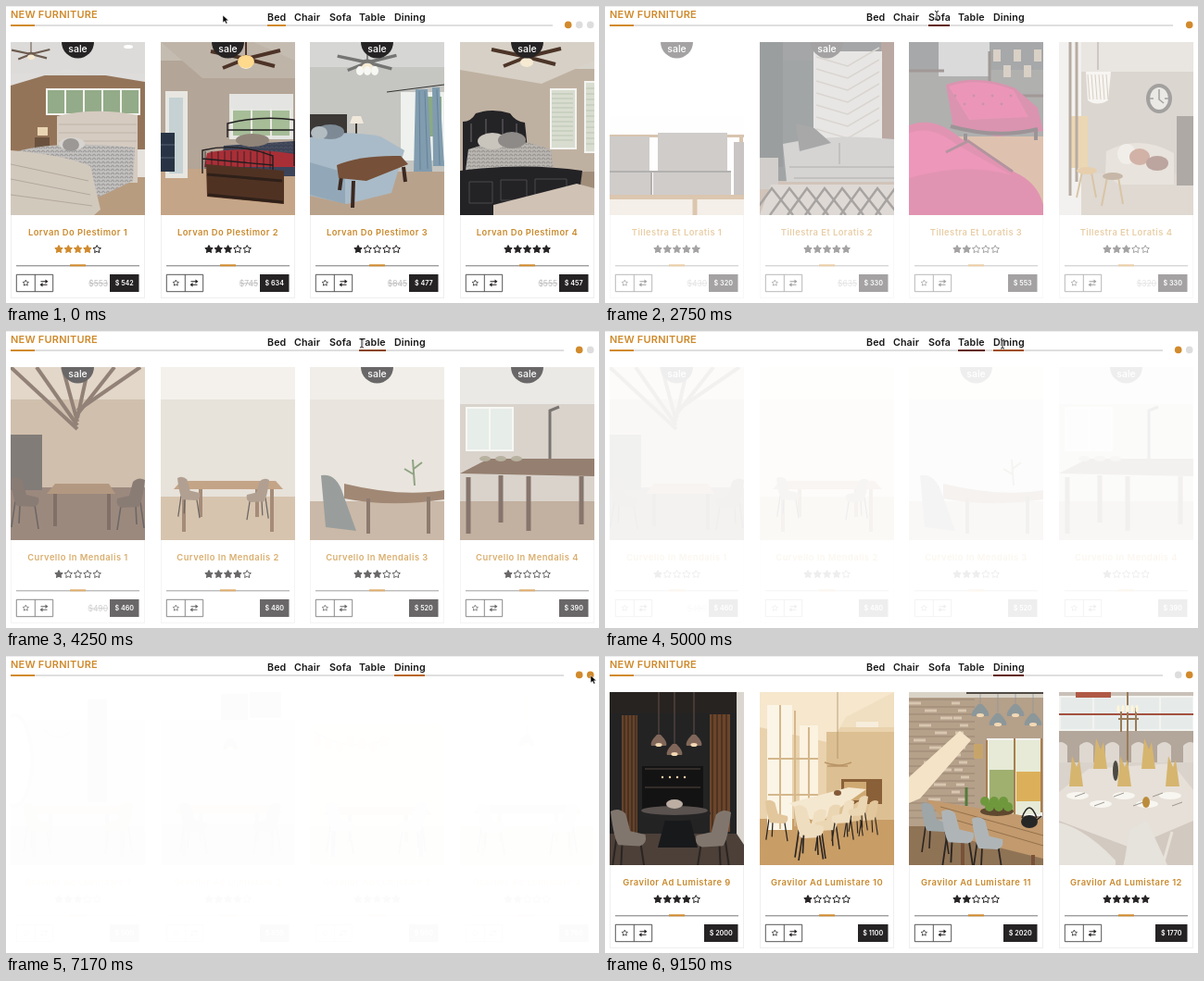
Animation, 640 px wide and 321 px high, one loop 9290 ms. Source, as an HTML page:

```html
<!DOCTYPE html>
<html lang="en">
<head>
<meta charset="utf-8">
<title>New furniture</title>
<style>
html, body { margin: 0; width: 100%; height: 100%; overflow: hidden; background: #fff; }
svg { display: block; width: 640px; height: 321px; font-family: Inter, "Open Sans", sans-serif; }
.head { font-size: 11px; font-weight: 600; letter-spacing: .2px; fill: #cf8a2c; }
.tab { font-size: 10.7px; font-weight: 600; letter-spacing: .1px; fill: #161616; }
.title { font-size: 9.4px; font-weight: 600; letter-spacing: .45px; fill: #c98a2e; text-anchor: middle; }
.sale { font-size: 10.5px; font-weight: 500; fill: #fff; text-anchor: middle; }
.price { font-size: 7.2px; font-weight: 600; fill: #fff; text-anchor: middle; }
.old { font-size: 8.5px; fill: #bbb; text-anchor: end; text-decoration: line-through; }
</style>
</head>
<body>
<script>
const LOOP = 9290, GOLD = '#d18a2c', INK = '#262324', MAROON = '#621d10';

// drawing helpers
const p = (fill, d) => `<path fill="${fill}" d="${d}"/>`;
const l = (color, w, d) => `<path fill="none" stroke="${color}" stroke-width="${w}" d="${d}"/>`;
const b = (fill, x, y, w, h) => `<rect fill="${fill}" x="${x}" y="${y}" width="${w}" height="${h}"/>`;
const e = (fill, x, y, rx, ry = rx) => `<ellipse fill="${fill}" cx="${x}" cy="${y}" rx="${rx}" ry="${ry}"/>`;
const text = (cls, x, y, s) => `<text class="${cls}" x="${x}" y="${y}">${s}</text>`;
const rep = (n, fn) => Array.from({ length: n }, (_, i) => fn(i)).join('');
const room = (ceiling, wall, floor, top, bottom) =>
  b(ceiling, 0, 0, 145, top) + b(wall, 0, top, 145, bottom - top) + b(floor, 0, bottom, 145, 187 - bottom);
const panes = (n, x, y, w, h, glass) =>
  b('#f3f3ef', x, y, n * w + 2, h) + rep(n, i => b(glass, x + 2 + i * w, y + 2, w - 2, h - 4));
const fan = (x, y, c, s = 1) => `<g transform="translate(${x} ${y}) scale(${s})">` +
  l(c, 4, 'M0 0l-38-8M0 0l37-9M0 0l-25 10M0 0l31 8') + l(c, 2, 'M0-30V0') + e(c, 0, 0, 7, 4) + e('#f6ead2', 0, 6, 7, 5) + '</g>';
const pendant = (x, y, c, r = 8) => l(c, .7, `M${x} 0V${y - r}`) +
  p(c, `M${x - 2} ${y - r}h4Q${x + r + 2} ${y} ${x + r} ${y + 4}H${x - r}Q${x - r - 2} ${y} ${x - 2} ${y - r}z`) +
  e('#f3d9b4', x, y + 3, r * .45, 2);
const chair = (x, y, c, s = 1) => `<g transform="translate(${x} ${y}) scale(${s} ${Math.abs(s)})">` +
  l('#2a2522', 1.6, 'M5 24 1 52M26 28l4 26M10 28l-1 20') +
  p(c, 'M0 0Q7-4 13 2L17 17 30 20Q32 28 25 30L7 29Q3 25 0 0z') + '</g>';
const table = (c, y, legs) => p(c, `M22 ${y}H124l8 9H14z`) +
  l(legs, 4, `M25 ${y + 9}V178M120 ${y + 9}V178M43 ${y + 9}V162M104 ${y + 9}V162`);
const woven = d => p('url(#weave)', d);

const scenes = {
  bed: [
    room('#dcdbd9', '#947459', '#b89c80', 36, 130) + p('#dedddb', 'M0 34h145v9L60 29 0 47z') +
      fan(22, 13, '#6d5c50', .55) + e('#fff', 127, 5, 5, 2) + panes(5, 38, 50, 20, 29, '#93ab88') +
      b('#ead5b2', 29, 92, 11, 9) + b('#6a513e', 26, 103, 16, 15) +
      p('#d5cbc0', 'M50 80Q92 70 137 79v73H50z') + l('#b9aea2', .8, 'M52 89h84M52 98h84M52 107h84') +
      p('#c3c1bf', 'M8 118Q50 106 134 114l-2 36-36 17z') + woven('M8 118Q50 106 134 114l-2 36-36 17z') +
      e('#d7d4d0', 66, 110, 14, 7) + e('#9b9895', 65, 111, 9, 7) +
      p('#d2c9bd', 'M0 117Q58 122 86 134l11 47-7 6H0z') + l('#aaa095', .8, 'M0 132l84 18M0 148l86 17M0 165l88 12') +
      b('#e6e2dc', 137, 116, 8, 30),
    room('#c5bcb1', '#b3a597', '#c5a587', 20, 137) + p('#bfb4a8', 'M0 0 45 39H145V20L100 0z') +
      fan(92, 18, '#4d3327') + e('#ffd98c', 92, 21, 9, 7) + b('#e8e6e1', 5, 53, 24, 94) + b('#c5d1d3', 9, 60, 15, 82) +
      b('#e4e5e2', 74, 56, 69, 49) + b('#a6bd98', 77, 74, 63, 27) + rep(4, i => b('#eceae5', 76 + i * 21, 72, 2, 32)) +
      b('#283445', 0, 98, 15, 42) + l('#566273', 1, 'M0 111h15M0 125h15') + p('#3b4358', 'M68 112 145 107v38H64z') +
      woven('M68 112 145 107v12H66z') + p('#a92f37', 'M50 120Q82 112 145 121v14H47z') + e('#918579', 99, 106, 18, 7) +
      l('#211e20', 1.4, 'M72 103V88q36-9 72-4v50M72 95h72M45 142v-25q38-9 76 6v20M45 126l76 7') +
      rep(11, i => l('#211e20', .8, `M${48 + i * 7} 118v19`)) +
      p('#503223', 'M49 132 133 139v36l-83-8z') + l('#2e2019', 3, 'M50 143l81 7M51 165l81 8'),
    room('#d6d7d5', '#c5c5c1', '#b9a28c', 27, 140) + fan(62, 22, '#757573', .85) + rep(3, i => e('#f7f7f3', 54 + i * 8, 31, 4, 5)) +
      b('#eef1ed', 98, 54, 47, 74) + b('#8aaa82', 125, 59, 17, 43) + l('#333', 1, 'M83 54 145 46') +
      p('#819cae', 'M114 51h13l5 89h-20zM132 49h8l5 85h-12z') + l('#64839a', 1, 'M118 53l1 85M124 53l3 84M137 51l3 82') +
      b('#3b3836', 0, 78, 40, 31) + p('#f0e8da', 'M46 80h9l3 8H43z') + l('#41342d', 2, 'M50 88v17') +
      p('#a9bbc8', 'M0 103Q35 94 76 102l26 15-14 46-48 12L0 166z') + e('#7d8a95', 22, 97, 15, 8) + e('#b2bcc1', 10, 98, 9, 7) +
      p('#92a8b8', 'M0 130 38 141v34L0 165z') + l('#3b2820', 4, 'M34 145l-2 15M47 150l-1 29M101 135l2 16') +
      p('#765039', 'M29 133Q54 122 98 123l8 9-45 18-30-3z'),
    room('#d8d3ca', '#bfb1a1', '#a08e7b', 29, 140) + p('#d7d0c6', 'M0 30 88 45 145 20V0H0z') + fan(72, 16, '#4c3528') +
      panes(1, 97, 50, 27, 66, '#d8ddd0') + panes(1, 134, 42, 20, 78, '#d8ddd0') +
      rep(11, i => l('#aeb9a4', .7, `M99 ${56 + i * 5}h23M136 ${50 + i * 6}h9`)) + p('#242326', 'M3 140V86Q12 86 17 77 35 71 54 77 60 86 70 87l5 49z') +
      l('#49464a', 2, 'M12 108V88M28 107V83M46 107V83M61 107V88') +
      p('#bab6b1', 'M9 116Q60 98 98 117l4 29-96-7z') + woven('M9 116Q60 98 98 117l4 29-96-7z') +
      e('#c9c5bd', 35, 107, 16, 9) + e('#8d8a87', 56, 106, 15, 9) +
      p('#232225', 'M0 139Q70 130 132 139l-4 31-91 17H0z') + l('#4b484b', 1, 'M10 151h25v23H10zM44 149h28v22H44zM81 148h34v17H81z') +
      p('#d0c3b5', 'M36 176 126 153l19 5v29H36z')
  ],
  chair: [
    room('#d2d4d4', '#d0d2d2', '#dededd', 40, 158) + l('#96663e', 4, 'M11 45Q9 102 19 115M50 44Q44 90 51 113M11 47q20-11 39-1M18 90h30') +
      l('#96663e', 2, 'M25 48q5 26-1 42M38 47q-6 27 1 43') + l('#96663e', 4, 'M20 124v63M94 120l-7 63M56 130l5 57') +
      p('#708078', 'M33 116Q62 102 98 113l-5 13-50 6z') + e('#c8bba8', 64, 96, 12, 8) + e('#f1eee9', 64, 91, 9, 4) +
      p('#e9e7e4', 'M17 103Q41 88 54 116l15 57-22 13-42-3z') + l('#bcb6b0', 1.5, 'M20 113q12 42 4 69M38 109q7 35 15 65') +
      b('#eeeeec', 104, 131, 17, 26) + l('#c7a47b', 1.5, 'M112 132l-9-49M113 132l4-50M111 132l16-43'),
    room('#bbb4ae', '#bab2ad', '#81807e', 30, 145) + p('#605f61', 'M0 158 145 122v19L0 178z') +
      l('#6a3c23', 5, 'M39 62l5 118M77 60l5 60M104 112v56M65 120v66M43 113l20 9 43-9M43 150l60-2') +
      p('#4c352b', 'M37 60 77 58l3 17-40 2zM39 83l41-1 1 10-41 1z') +
      p('#523626', 'M40 110 67 102 108 111 65 122z') + p('#824a32', 'M48 104h40v9H49z'),
    room('#e3e6e8', '#dadde0', '#c79866', 48, 145) + p('#fff', 'M0 0h51v121L0 130z') + l('#d6dde0', 2, 'M24 0v119M4 12h42M8 57h38') +
      rep(14, i => l('#c5cbce', .8, `M40 ${i * 7}h12`)) + p('#dadde0', 'M145 140V125L42 119 0 148v12z') +
      l('#b28253', 1, 'M0 168l145-28M20 187 145 155M0 155l108 32') + l('#b88c5b', 2, 'M75 138l-15 45M98 136l6 38M86 138l9 45') +
      p('#f5f5f2', 'M56 123q19 5 22-9 0-19 21-22 19 0 13 27-4 21-23 21-26 0-33-17z') + l('#bfc2c1', 1, 'M79 119q15 12 32 3') +
      e('#202326', 40, 148, 25, 11) + e('#454b4e', 40, 144, 25, 8) + e('#eee', 32, 142, 6, 3) + e('#c59a62', 47, 143, 4, 3) +
      l('#252729', 2, 'M17 152v35M62 152v33M39 158v29'),
    room('#e9b24d', '#e5aa40', '#bfc3c2', 40, 130) + p('#eac26d', 'M0 0H145V35Q75 16 0 55z') +
      p('#7f9192', 'M0 126q72 4 145 0v24q-70 4-145-1z') + p('#d8d7d1', 'M0 153h145v34H0z') + l('#8d8e87', 2, 'M0 157q74-8 145 0') +
      l('#9f4f25', 1.5, 'M52 134V66Q45 43 35 55M42 135l10-24 13 24') + p('#f4eee0', 'M34 54Q53 28 70 54z') +
      e('#ad5527', 54, 98, 17, 3) + e('#76442e', 52, 135, 10, 3) +
      p('#26424d', 'M73 97q18-4 35 2l2 14-4 8H81l-6-10z') + p('#142e39', 'M78 113h29l-3 7H81z') + l('#1c2e35', 2, 'M82 121l-6 18M102 121l6 18')
  ],
  sofa: [
    room('#fff', '#fdfdfc', '#e5d8c8', 80, 168) + b('#a3723f', 0, 100, 145, 3) + rep(5, i => b('#a3723f', i * 35, 101, 4, 48)) +
      b('#8b847e', 0, 102, 43, 39) + b('#8d8680', 52, 98, 75, 43) + b('#7d7672', 134, 108, 11, 57) +
      p('#8d8680', 'M0 140h45v25H0zM47 140h84v25H47z') + l('#4b4543', 2, 'M0 140h131M45 140v25') +
      b('#aa7740', 0, 165, 145, 5) + l('#aa7740', 5, 'M92 170v17'),
    room('#262d2e', '#1f292c', '#94745c', 20, 150) + p('#5c3024', 'M131 0h14v120h-14z') + b('#12191c', 0, 0, 25, 135) +
      b('#c9c4be', 58, 10, 74, 117) + rep(7, i => l('#a39b92', 1.5, `M61 ${16 + i * 13}l34 10 34-20`)) +
      b('#938b83', 0, 125, 20, 34) + p('#9b9896', 'M25 110Q82 98 145 105v46H29z') + l('#625e5b', 1.5, 'M86 109v23M32 135h113M37 147h108') +
      p('#313134', 'M39 88l20 5 18 16-34 9z') + p('#b0a59b', 'M12 154h133v33H0z') +
      rep(8, i => l('#2f2521', 2.5, `M${i * 19 - 8} 187l21-29 23 29`)),
    room('#2d3032', '#444442', '#b06f40', 30, 102) + b('#a6a7a9', 32, 0, 55, 37) + l('#1f0d06', 3, 'M0 31h38M87 10v48M145 58H87') +
      rep(5, i => b('#a58f78', 91 + i * 11, 8 + i % 2 * 17, 8, 13)) +
      p('#a60040', 'M40 46Q74 34 115 50l24 21 6 25-50 6-47-10z') + p('#cf0657', 'M43 48Q75 37 113 52l16 29-64 3z') +
      rep(7, i => e('#7c0035', 50 + i * 10, 58 + i % 2 * 9, 1.4)) + l('#140208', 4, 'M45 91q50 14 94 3M61 99v12M137 95v11') +
      p('#b80045', 'M0 90Q27 79 56 104l59 37q24 11 30 35v11H0z') + p('#d4085c', 'M0 98q25-9 52 13l59 33Q62 129 0 147z') +
      l('#4a001c', 3, 'M40 119l24-12 48 33'),
    room('#cbc0b5', '#aa9d90', '#b3a595', 32, 142) + p('#e3ded8', 'M0 0h24v187H0z') + b('#cfa04a', 13, 80, 18, 56) +
      l('#543b25', 3, 'M12 0v166M19 0v151') + l('#4a362e', 1, 'M42 0v30') + p('#ede8df', 'M29 32h27l-3 31q-12 7-22 0z') +
      rep(6, i => l('#a18b6d', 1, `M${31 + i * 4} 35l2 27`)) + e('#25201c', 108, 61, 14, 16) + e('#d0cbc2', 108, 61, 10, 12) +
      l('#25201c', 1.5, 'M108 51v11l5 4M98 61h4M114 61h4') + p('#c8bcac', 'M51 118Q87 99 124 120v34H65L50 143z') +
      e('#ded7cc', 73, 121, 10, 11) + e('#95482b', 87, 124, 11, 9) + e('#60261b', 106, 131, 12, 8) +
      b('#42322a', 127, 80, 18, 75) + l('#a5752c', 2, 'M25 140l-6 28M35 141l5 27M52 146l-6 31M64 146l5 29') +
      e('#c58e3c', 30, 139, 11, 4) + e('#785430', 58, 145, 11, 4)
  ],
  table: [
    room('#d5c5b1', '#bba389', '#705444', 35, 130) + rep(6, i => l('#61493a', 4, `M${i * 28} 0L72 ${67 - i * 4}`)) +
      b('#49423c', 0, 73, 34, 60) + p('#916a49', 'M48 126h58l7 11H39z') + l('#493124', 4, 'M48 137v35M106 137v39') + chair(0, 121, '#554238') + chair(145, 122, '#554238', -1),
    room('#f0ebe4', '#ddd5ca', '#c6aa8a', 35, 140) + table('#aa7c51', 123, '#7d593e') + chair(18, 120, '#8f7660', .8) + chair(117, 122, '#8f7660', -.8),
    room('#ebe7df', '#e0d9cf', '#b39a81', 35, 145) + p('#785337', 'M37 126q62 15 108 7v10q-58 9-108-1z') +
      l('#5b402f', 4, 'M63 142v38M128 140v40') + p('#6c7372', 'M12 117q17-3 24 21l14 39-33-4z') + l('#5e7a4a', 2, 'M113 128l-2-28M112 116l-10-6M112 110l9-7'),
    room('#e2dfda', '#c9c0b6', '#a78d76', 40, 145) + panes(2, 6, 43, 25, 48, '#dce5df') + l('#403832', 3, 'M97 115V47l10-4') +
      p('#664631', 'M0 115 31 99h114v19z') + l('#50372a', 5, 'M9 119v61M44 117v51M74 118v59M131 118v52') + rep(3, i => e('#978e75', 27 + i * 17, 99, 6, 3))
  ],
  dining: [
    room('#e9e4dc', '#cfc5b8', '#a78d73', 30, 145) + e('#898278', 5, 74, 20, 51) + e('#ede9e2', 4, 74, 17, 47) +
      b('#5b5a56', 83, 8, 21, 111) + l('#796653', 1.5, 'M35 40q17 16 29 3') + table('#a37a54', 123, '#71533d') + chair(13, 121, '#756b60') + chair(132, 121, '#756b60', -1),
    room('#dfd8cf', '#c6b8a8', '#a58d76', 30, 143) + b('#5f666a', 65, 2, 29, 28) + b('#5f666a', 96, 0, 34, 28) +
      pendant(75, 58, '#75624f') + table('#ad855f', 122, '#604634') + chair(20, 121, '#776657') + chair(130, 121, '#776657', -1),
    room('#eee9df', '#dbd1c3', '#b99b77', 35, 145) + l('#6c5542', 1, 'M4 43q38 24 82 7') + rep(7, i => e('#d8aa54', 8 + i * 12, 53 + i % 3 * 3, 4, 6)) +
      table('#aa784f', 124, '#825c42') + chair(17, 121, '#bdae9b') + chair(126, 121, '#bdae9b', -1),
    room('#eeeae4', '#dfd8ce', '#c5ad93', 35, 145) + pendant(72, 54, '#b89975') + table('#bd9775', 122, '#967357') + chair(18, 122, '#d1c5b5') + chair(127, 122, '#d1c5b5', -1)
  ],
  dining2: [
    room('#272321', '#232324', '#4c4039', 23, 153) + b('#65432b', 13, 25, 17, 130) + b('#6b452b', 108, 24, 22, 127) +
      rep(4, i => l('#322318', 1, `M${16 + i * 4} 25v130M${111 + i * 5} 24v127`)) + p('#dcd6d0', 'M137 0h8v165l-8-12z') +
      b('#141314', 35, 80, 66, 50) + l('#51463e', 1, 'M38 83h60M38 103h60') + pendant(53, 54, '#80675a') + pendant(70, 64, '#80675a') + pendant(91, 54, '#80675a') +
      rep(4, i => e('#ffd8a6', 57 + i * 8, 92, 1.2)) + p('#18191b', 'M60 138h27l8 30H52z') + e('#252425', 71, 131, 38, 8) + e('#59524f', 70, 128, 36, 5) +
      e('#bcaea3', 70, 121, 9, 5) + chair(1, 129, '#81766d', 1.25) + chair(131, 130, '#81766d', -1.25),
    room('#f0dfc0', '#e9d2ad', '#c89d66', 38, 137) + p('#f6e7cd', 'M0 0h145L93 27 77 55 0 38z') + p('#dcc093', 'M72 43h73v95H72z') +
      b('#fbf5e7', 8, 14, 27, 135) + b('#fbf2e0', 43, 36, 20, 96) + l('#d4b78b', 2, 'M9 72h54M9 111h54M22 14v134M53 38v93M38 20v125') +
      l('#a88558', .7, 'M84 0v72') + l('#b99567', 1.5, 'M70 76q15 6 29 0M73 80h22') + b('#8a6038', 88, 94, 44, 27) + b('#cfa972', 91, 97, 24, 20) +
      b('#f7eddc', 104, 32, 24, 6) + chair(112, 119, '#e3c79c', -.7) + chair(128, 118, '#e3c79c', -.7) +
      p('#f5e8d0', 'M32 120 96 103l19 2-44 31-16 2z') + chair(6, 118, '#e2c69c', .8) +
      rep(4, i => chair(72 + i * 15, 128 - i * 5, i % 2 ? '#ebd6b3' : '#f0dec0', -1 + i * .1)) +
      chair(37, 124, '#efddbf', 1.05) + e('#835938', 84, 109, 4, 3),
    room('#d9d3c8', '#b5a08a', '#8f7355', 6, 145) +
      rep(17, i => l('#8f7b69', .7, `M0 ${8 + i * 8}h71`) + l('#d8c6b0', 3, `M${i * 17 % 40} ${12 + i * 8}h13M${46 + i * 7 % 12} ${12 + i * 8}h9`)) +
      p('#f4e3c6', 'M0 92 55 42l12 10L12 115 0 120z') + panes(2, 84, 50, 29, 84, '#e6ead6') +
      b('#9fb06f', 87, 84, 26, 45) + b('#dcb05a', 116, 86, 27, 32) + l('#a97d4e', 2, 'M84 52v82M114 50v84M143 50v80') + b('#c7a56a', 70, 56, 10, 16) +
      rep(4, i => pendant(77 + i * 19, 22 + i % 2 * 10, '#8c979a', 9)) + l('#514b45', 2, 'M62 1h83') +
      p('#c29a6e', 'M18 116 145 137v43L57 158z') + l('#785139', 4, 'M58 158v29M134 176v11') + l('#94704b', 1, 'M34 124l111 31M46 137l99 29') +
      chair(13, 121, '#9ea6a8', 1) + chair(35, 129, '#afb5b7', 1.15) + chair(68, 137, '#afb5b7', 1.1) +
      e('#5e482f', 95, 129, 18, 5) + rep(6, i => e('#6f983d', 82 + i * 5, 118 + i % 2 * 6, 5)) + l('#547a3d', 3, 'M62 123v-20') +
      e('#252626', 130, 140, 9, 7) + l('#252626', 1.5, 'M122 136q8-22 16 0M137 139l6-5'),
    room('#c9c1b8', '#b3a69a', '#d9d3cc', 32, 76) + panes(4, 0, 4, 36, 38, '#e6ebea') + b('#b05a45', 18, 0, 38, 6) + l('#a4503f', 2, 'M0 24h145') +
      rep(6, i => p('#ded8d1', `M${i * 28 - 6} 76v-18q8-8 15 0v18z`)) +
      p('#e6e0d8', 'M0 108 32 83 122 77l23 29v37L77 169 0 140z') + p('#d2c9c0', 'M0 139 77 168l68-29v48H0z') +
      l('#e8e2da', 3, 'M17 151l15 35M76 168l-5 19M122 151l-9 32') + p('#e6e2dc', 'M70 187l6-38 19-10 22 48zM0 141q29 7 61 41v5H0z') +
      l('#987b58', 2, 'M74 99V0M64 29h22M67 21v22M83 17v25') + rep(5, i => e('#fff5d8', 64 + i * 5, 18, 1.5, 4)) +
      rep(5, i => p('#d6b56f', `M${11 + i * 26} ${102 - i % 2 * 19}l3-33 5 12 3-8 4 29z`) + e('#f8f6f0', 20 + i * 25, 112 + i % 2 * 9, 12, 4)) +
      rep(6, i => l('#9c9890', 1, `M${17 + i * 21} ${113 + i % 2 * 10}l11-4`)) + e('#bc8c3d', 94, 119, 4, 6) + e('#4d4a42', 61, 85, 3, 11)
  ]
};

// name, first number, ratings, badges, prices, struck prices
const panels = {
  bed: ['Lorvan Do Plestimor', 1, [4, 3, 1, 5], [1, 1, 1, 1], [542, 634, 477, 457], [553, 745, 845, 555]],
  chair: ['Morbelo Si Tandus', 1, [3, 3, 2, 4], [1, 0, 1, 0], [90, 70, 100, 140], [134, 0, 132, 0]],
  sofa: ['Tillestra Et Loratis', 1, [5, 5, 2, 3], [1, 1, 0, 0], [320, 330, 553, 330], [430, 635, 0, 320]],
  table: ['Curvello In Mendalis', 1, [1, 4, 3, 1], [1, 0, 1, 1], [460, 480, 520, 390], [490, 0, 0, 0]],
  dining: ['Gravilor Ad Lumistare', 1, [3, 4, 5, 2], [0, 0, 0, 0], [900, 850, 990, 780], [0, 0, 0, 0]],
  dining2: ['Gravilor Ad Lumistare', 9, [4, 1, 2, 5], [0, 0, 0, 0], [2000, 1100, 2020, 1770], [0, 0, 0, 0]]
};

const starPath = 'M' + rep(10, i => {
  const a = i * Math.PI / 5, r = i % 2 ? 2.2 : 4.4;
  return `${(r * Math.sin(a)).toFixed(2)} ${(-r * Math.cos(a)).toFixed(2)} `;
}) + 'z';
const star = (x, y, c, full, s = 1) =>
  `<path d="${starPath}" transform="translate(${x} ${y}) scale(${s})" fill="${full ? c : 'none'}" stroke="${c}" stroke-linejoin="round"/>`;
// the digit 1 is narrower than the others
const priceWidth = n => 16.5 + [...String(n)].reduce((sum, d) => sum + (d === '1' ? 3 : 5), 0);

function card(id, i) {
  const [name, first, stars, sale, price, old] = panels[id];
  const tint = id === 'bed' && !i ? GOLD : INK, w = priceWidth(price[i]), right = 138.5;
  return `<g transform="translate(${Math.round(5 + 161.6 * i)} 39)">` +
    `<rect x=".5" y=".5" width="144" height="276" fill="#fff" stroke="#efefef"/>` +
    `<g clip-path="url(#photo)">${scenes[id][i]}</g>` +
    (sale[i] ? p(INK, 'M55 0a17.5 17.5 0 0 0 35 0z') + text('sale', 72.5, 10.5, 'sale') : '') +
    text('title', 72.5, 209, `${name} ${first + i}`) +
    rep(5, k => star(52 + k * 10.3, 224, k < stars[i] ? tint : INK, k < stars[i])) +
    b('#777', 6, 241.3, 133, 1) + b(GOLD, 64, 240.3, 17, 2) +
    l('#444', .9, 'M6.3 251.3h39.4v18.4h-39.4zM26.3 251.3v18.4') + star(16.3, 260.5, INK, false, .75) +
    l(INK, 1.1, 'M32.5 258.8h6.5M33 262.2h6.5') + p(INK, 'M37.5 256.6l3 2.2-3 2.2zM34.5 260l-3 2.2 3 2.2z') +
    b(INK, right - w, 251, w, 19) + text('price', right - w / 2, 263, `$ ${price[i]}`) +
    (old[i] ? text('old', right - w - 2, 263.5, '$' + old[i]) : '') + '</g>';
}

// every track is a keyframe rule over the whole loop
let css = '';
function track(id, prop, stops) {
  const all = [...stops, [LOOP, stops[stops.length - 1][1]]];
  css += `@keyframes ${id}{${all.map(([t, v]) => `${(t / LOOP * 100).toFixed(3)}%{${prop}:${v}}`).join('')}}` +
    `#${id}{animation:${id} ${LOOP}ms linear infinite}`;
}
const show = (id, from, to) => track(id, 'opacity', [
  ...(from ? [[0, 0], [from - 1, 0]] : []), [from, 1], ...(to < LOOP ? [[to - 1, 1], [to, 0]] : [])]);

track('bed', 'opacity', [[0, 1], [500, 1], [1060, 0]]);
track('chair', 'opacity', [[0, 0], [1080, 0], [1580, .62], [1790, 1], [1980, 1], [2450, 0]]);
track('sofa', 'opacity', [[0, 0], [2460, 0], [2750, .42], [3150, 1], [3280, 1], [3750, .05], [3800, 0]]);
track('table', 'opacity', [[0, 0], [3800, 0], [4450, 1], [4560, 1], [5000, .08], [5050, 0]]);
track('dining', 'opacity', [[0, 0], [5060, 0], [5900, 1], [6650, 1], [7170, .02], [7200, 0]]);
track('dining2', 'opacity', [[0, 0], [7220, 0], [8250, 1]]);

// tab: label, x, width, underline on/off, page count, pager on/off, underline colours
const tabs = [
  ['Bed', 282, 20, 0, 1060, 3, 0, 1060, [[0, GOLD], [1060, GOLD]]],
  ['Chair', 311, 29, 400, 2460, 2, 1060, 2460, [[0, GOLD], [1000, GOLD], [1580, '#a8561c'], [2000, MAROON]]],
  ['Sofa', 349, 23, 2080, 3800, 1, 2460, 3800, [[0, GOLD], [2200, GOLD], [2700, MAROON]]],
  ['Table', 381, 29, 3250, 5050, 2, 3800, 5050, [[0, GOLD], [3800, GOLD], [4500, MAROON]]],
  ['Dining', 419, 33, 4560, LOOP, 2, 5050, LOOP, [[0, GOLD], [4650, GOLD], [5000, '#a04d19'], [5600, MAROON], [6400, MAROON], [7170, '#b8651e'], [8300, '#b8651e'], [9150, MAROON]]]
];
const header = tabs.map(([label, x, w, on, off, pages, start, end, colors], i) => {
  show('mark' + i, on, off);
  track('tone' + i, 'fill', colors);
  show('pager' + i, start, end);
  const dots = rep(pages, k =>
    `<circle id="dot${i}${k}" cx="${630.7 - 12 * (pages - 1 - k)}" cy="20.4" r="3.8" fill="${k ? '#ddd' : GOLD}"/>`);
  return `<g id="pager${i}">${b('#dfdfdf', 5, 20, Math.round(620 - 11.7 * pages), 2)}${dots}</g>` +
    `<g id="mark${i}"><rect id="tone${i}" x="${x}" y="20" width="${w}" height="2"/></g>` + text('tab', x, 16, label);
}).join('');
track('dot40', 'fill', [[0, GOLD], [7200, GOLD], [7450, '#ddd']]);
track('dot41', 'fill', [[0, '#ddd'], [6520, '#ddd'], [6650, GOLD]]);

const at = (x, y) => `translate(${x}px,${y}px)`;
track('cursor', 'transform', [[0, at(234, 10)], [80, at(236, 10)], [450, at(321, 12)], [1880, at(321, 12)], [2100, at(358, 10)],
  [3050, at(358, 10)], [3300, at(384, 13)], [4350, at(384, 13)], [4600, at(429, 14)], [5880, at(429, 14)],
  [6250, at(588, 16)], [6400, at(588, 16)], [6540, at(634, 21)], [6700, at(631, 21)]]);
track('arrow', 'opacity', [[0, 1], [420, 1], [421, 0], [5919, 0], [5920, 1], [8829, 1], [8830, 0]]);
show('beam', 421, 5920);

document.body.innerHTML = `<svg viewBox="0 0 640 321"><clipPath id="photo"><path d="M0 0h145v187H0z"/></clipPath>` +
  `<pattern id="weave" width="5" height="4" patternUnits="userSpaceOnUse">${l('#66646466', 1.2, 'M0 1l2 2M3 3l2-2')}</pattern>` +
  b('#eee', 0, 0, 640, 1) +
  Object.keys(panels).map(id => `<g id="${id}">${rep(4, i => card(id, i))}</g>`).join('') +
  header + text('head', 5, 13, 'NEW FURNITURE') + b(GOLD, 5, 20, 26, 2) +
  `<g id="cursor"><path id="arrow" d="M0 0v8l2-1.7 1.5 3 1.4-.7-1.4-2.9h2.7z" fill="#000" stroke="#fff" stroke-width=".5"/>` +
  `<g id="beam">${l('#fff', 2, 'M0-4v8')}${l('#222', 1, 'M-2-4.5Q0-4.5 0-3V3.5Q0 5-2 5M2-4.5Q0-4.5 0-3M0 3.5Q0 5 2 5')}</g></g></svg>`;
document.head.insertAdjacentHTML('beforeend', `<style>${css}</style>`);
</script>
</body>
</html>
```
